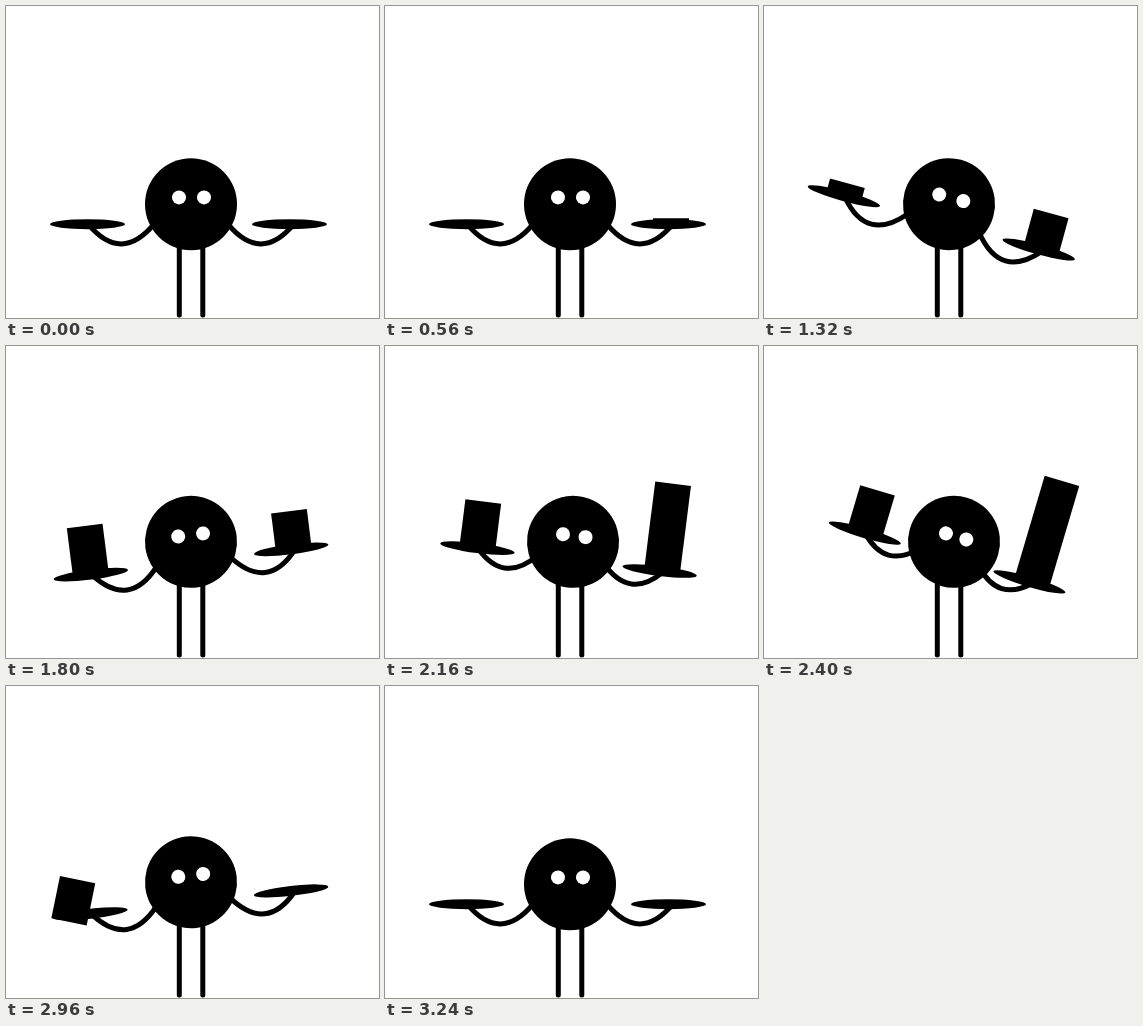
An HTML page with a canvas for the animation above (3360 ms loop, 373 px wide and 312 px high).

```html
<!DOCTYPE html>
<html lang="en">
<head>
<meta charset="utf-8">
<title>Balancing hats</title>
<style>
  html, body { margin: 0; width: 100%; height: 100%; overflow: hidden; background: #fff; }
  canvas { display: block; }
</style>
</head>
<body>
<canvas id="stage" width="373" height="312"></canvas>
<script>
const ctx = document.getElementById('stage').getContext('2d');
const LOOP = 3360, STEP = 40;
const LEFT = -1, RIGHT = 1;
const DROP = { [LEFT]: 2880, [RIGHT]: 2520 };
const HAT_WIDTH = 36, GRAVITY = 7150, SLIDE = 345, SPIN = 135;
const RAD = Math.PI / 180;

// Eased step from 0 to 1 between two times.
function ramp(t, from, to) {
  const u = Math.min(1, Math.max(0, (t - from) / (to - from)));
  return u * u * (3 - 2 * u);
}

// The figure leans toward the heavier side; reach shrinks as it strains.
function poseAt(t) {
  const strain = ramp(t, 1840, 2400), slip = ramp(t, 2400, 2720);
  const release = ramp(t, 2720, 2960);
  return {
    x: 185 + 5 * (strain - release),
    y: 198.2 - 2.4 * (ramp(t, 1320, 1800) - ramp(t, 2880, 3200)),
    tilt: 15.3 * ramp(t, 600, 1080) - 22.5 * ramp(t, 1320, 1800)
      + 23.7 * strain + 5 * slip - 28 * release + 6.5 * ramp(t, 2960, 3240),
    reach: 1 - 0.15 * (strain + slip) + 0.3 * release
  };
}

function hatHeight(side, t) {
  return side === LEFT
    ? 38 * ramp(t, 1240, 1440) + 11 * ramp(t, 1440, 1800) - 6 * ramp(t, 1800, 2720)
    : 38 * ramp(t, 480, 800) + 68 * ramp(t, 1840, 2320) + 44 * ramp(t, 2400, 2520);
}

function plateCentre(side, reach) {
  return [reach * (side * 101 - 2.5), reach * 20];
}

function place(x, y, degrees, draw) {
  ctx.save();
  ctx.translate(x, y);
  ctx.rotate(degrees * RAD);
  draw();
  ctx.restore();
}

function ellipse(x, y, rx, ry = rx) {
  ctx.beginPath();
  ctx.ellipse(x, y, rx, ry, 0, 0, Math.PI * 2);
  ctx.fill();
}

function hat(x, y, height) {
  if (height > 0) ctx.fillRect(x - HAT_WIDTH / 2, y - height, HAT_WIDTH, height);
}

function hatShift(side) {
  return side === RIGHT ? 2.5 : 0;
}

function drawArm(side, reach) {
  const hand = side * 102 * reach, shoulder = side * 37 * reach;
  ctx.beginPath();
  ctx.moveTo(hand, 21 * reach);
  ctx.quadraticCurveTo((hand + shoulder) / 2, 20 * reach + 39 * reach ** 2, shoulder, 20 * reach);
  ctx.stroke();
}

function drawSide(side, reach, t) {
  const [x, y] = plateCentre(side, reach);
  drawArm(side, reach);
  ellipse(x, y, 37.5, 5);
  if (t < DROP[side]) hat(x + hatShift(side), y, hatHeight(side, t));
}

// A dropped hat slides outward from its plate, spinning as it falls.
function drawFall(side, t) {
  const age = (t - DROP[side]) / 1000;
  if (age < 0) return;
  const { x, y, tilt, reach } = poseAt(DROP[side]);
  const [px, py] = plateCentre(side, reach);
  const bx = px + hatShift(side), c = Math.cos(tilt * RAD), s = Math.sin(tilt * RAD);
  place(
    x + bx * c - py * s + side * SLIDE * age,
    y + bx * s + py * c + GRAVITY * age * age / 2,
    tilt - side * SPIN * age,
    () => hat(0, 0, hatHeight(side, t))
  );
}

function draw(t) {
  const { x, y, tilt, reach } = poseAt(t);
  ctx.fillStyle = '#fff';
  ctx.fillRect(0, 0, 373, 312);
  ctx.fillStyle = ctx.strokeStyle = '#000';
  ctx.lineCap = 'round';
  ctx.lineWidth = 5;

  for (const leg of [173.3, 196.8]) {
    ctx.beginPath();
    ctx.moveTo(leg, y);
    ctx.lineTo(leg, 309);
    ctx.stroke();
  }
  for (const side of [LEFT, RIGHT]) drawFall(side, t);

  place(x, y, tilt, () => {
    for (const side of [LEFT, RIGHT]) drawSide(side, reach, t);
    ellipse(0, 0, 46);
    ctx.fillStyle = '#fff';
    for (const side of [LEFT, RIGHT]) ellipse(0.5 + side * 12.5 * reach, -6.8 * reach, 7);
  });
}

const start = performance.now();
function tick() {
  const t = (performance.now() - start) % LOOP;
  draw(Math.floor(t / STEP) * STEP);
  requestAnimationFrame(tick);
}
tick();
</script>
</body>
</html>
```
